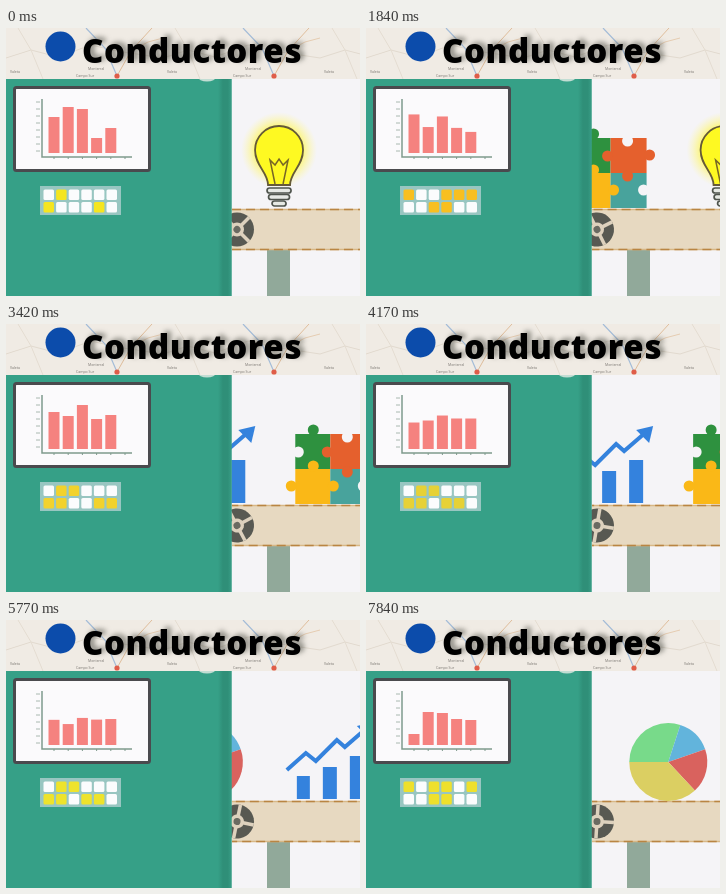
Recreate the animation shown at these times as an HTML page with a canvas. Size 354 px wide and 268 px high, loop 7.86 s.

```html
<!DOCTYPE html>
<html lang="es">
<head>
<meta charset="utf-8">
<title>Conductores</title>
<style>
  html, body { margin: 0; width: 100%; height: 100%; overflow: hidden; background: #f5f4f7; }
  canvas { position: absolute; left: 0; top: 0; }
  h1 {
    position: absolute; left: 76px; top: 1px; margin: 0;
    font: 800 33px/44px "Open Sans", sans-serif; letter-spacing: .5px;
    color: #000; white-space: nowrap;
    text-shadow: 4px -2px 5px rgba(80, 80, 72, .6);
  }
</style>
</head>
<body>
<canvas id="stage" width="354" height="268"></canvas>
<h1>Conductores</h1>
<script>
const ctx = document.getElementById('stage').getContext('2d');
const LOOP = 7860, TAU = Math.PI * 2;

// time, tops of the five bars, lamp rows, lamp colour
const KEYS = [
  [0,    [89, 79, 81, 110, 100],  '010000100010', '#f5e51f'],
  [1110, [94, 94, 92, 114, 116],  '100111011100', '#f7e71c'],
  [2560, [79, 104, 85, 86, 92],   '100111001100', '#f8bf20'],
  [3420, [88, 92, 81, 95, 91],    '011000110011', '#f2d22c'],
  [4920, [109, 101, 102, 94, 98], '011000110110', '#e6d136'],
  [6590, [91, 107, 94, 105, 100], '011000110110', '#eee32c'],
  [7840, [114, 92, 93, 99, 100],  '101101001100', '#eee02c']
];

function rect(x, y, w, h, fill) {
  ctx.fillStyle = fill;
  ctx.fillRect(x, y, w, h);
}

function disc(x, y, r, fill, ry = r) {
  ctx.fillStyle = fill;
  ctx.beginPath();
  ctx.ellipse(x, y, r, ry, 0, 0, TAU);
  ctx.fill();
}

function line(points, color, width, dash = [], shift = 0) {
  ctx.strokeStyle = color;
  ctx.lineWidth = width;
  ctx.setLineDash(dash);
  ctx.lineDashOffset = shift;
  ctx.beginPath();
  for (let i = 0; i < points.length; i += 2) ctx.lineTo(points[i], points[i + 1]);
  ctx.stroke();
  ctx.setLineDash([]);
}

function at(x, draw) {
  ctx.save();
  ctx.translate(x, 0);
  draw();
  ctx.restore();
}

function bulb() {
  const glow = ctx.createRadialGradient(0, 122, 22, 0, 122, 38);
  glow.addColorStop(0, 'rgba(255, 246, 70, .8)');
  glow.addColorStop(1, 'rgba(255, 246, 150, 0)');
  disc(0, 122, 38, glow);
  ctx.beginPath();
  ctx.moveTo(-11, 157);
  ctx.bezierCurveTo(-11, 144, -24, 138, -24, 122);
  ctx.arc(0, 122, 24, Math.PI, 0);
  ctx.bezierCurveTo(24, 138, 11, 144, 11, 157);
  ctx.closePath();
  ctx.fillStyle = '#fef922';
  ctx.fill();
  ctx.strokeStyle = '#655a38';
  ctx.lineWidth = 1.8;
  ctx.stroke();
  line([-4, 156, -9, 132, -4, 137, 0, 131, 4, 137, 9, 132, 4, 156], '#776626', 1.5);
  for (const [y, w] of [[160, 12], [166.5, 10.5], [173, 7]]) {
    ctx.beginPath();
    ctx.roundRect(-w, y, w * 2, 5, 2.5);
    ctx.fillStyle = '#e6e9e4';
    ctx.fill();
    ctx.strokeStyle = '#4f544d';
    ctx.lineWidth = 1.7;
    ctx.stroke();
  }
}

function puzzle() {
  const green = '#2e913f', red = '#e5602d', yellow = '#fab817', teal = '#48a39c', gap = '#f5f4f7';
  rect(-35, 110, 35, 35, green);
  rect(0, 110, 36, 35, red);
  rect(-35, 145, 35, 35, yellow);
  rect(0, 145, 36, 35, teal);
  const knobs = [
    [-17, 106, green], [-32, 128, gap], [17, 113, gap], [39, 127, red],
    [-3, 128, red], [-17, 142, yellow], [17, 148, red], [3, 162, yellow],
    [-39, 162, yellow], [33, 162, gap]
  ];
  for (const [x, y, fill] of knobs) disc(x, y, 5.5, fill);
}

function growth() {
  const blue = '#3482dd';
  rect(-33, 156, 13, 23, blue);
  rect(-7, 147, 14, 32, blue);
  rect(20, 136, 14, 43, blue);
  line([-43, 150, -24, 133, -14, 141, 7, 120, 15, 127, 37, 108], blue, 4);
  ctx.fillStyle = blue;
  ctx.beginPath();
  ctx.moveTo(44, 102);
  ctx.lineTo(27, 106);
  ctx.lineTo(40, 119);
  ctx.fill();
}

function pie() {
  const colors = ['#78da8a', '#62b4dc', '#d9625e', '#dbcf62'];
  const edges = [180, 288, 341, 407, 540];
  colors.forEach((fill, i) => {
    ctx.beginPath();
    ctx.moveTo(0, 142);
    ctx.arc(0, 142, 39, edges[i] * TAU / 360, edges[i + 1] * TAU / 360);
    ctx.closePath();
    ctx.fillStyle = fill;
    ctx.fill();
  });
}

function wheel(angle) {
  const light = '#ddd1bd';
  ctx.save();
  ctx.translate(231, 201.5);
  ctx.rotate(angle + TAU / 8);
  disc(0, 0, 17, '#585952');
  line([-17, 0, 17, 0], light, 3.5);
  line([0, -17, 0, 17], light, 3.5);
  disc(0, 0, 7, light);
  disc(0, 0, 3.5, '#6a6a61');
  ctx.restore();
}

function conveyor(d) {
  rect(225, 51, 129, 217, '#f5f4f7');
  rect(261, 222, 23, 46, '#91a99a');
  rect(226, 182, 128, 40, '#e7d9c1');
  for (const [y, dir] of [[181.5, -1], [221.5, 1]]) {
    line([226, y, 354, y], '#d8b886', 1.5);
    line([226, y, 354, y], '#b98543', 1.5, [9, 5], dir * d);
  }
  wheel(d / 17);
  at(273 + d, bulb);
  at(159 + d, puzzle);
  at(40 + d, growth);
  at(-86 + d, pie);
}

function machine() {
  rect(0, 51, 225.5, 217, '#36a087');
  const shade = ctx.createLinearGradient(212, 0, 226, 0);
  shade.addColorStop(0, '#36a087');
  shade.addColorStop(.35, '#2f8f78');
  shade.addColorStop(.7, '#2f8f78');
  shade.addColorStop(1, '#3a9f88');
  rect(212, 51, 13.5, 217, shade);
  disc(201, 49, 9, '#c2ddd3', 4.5);
}

function screen(tops) {
  ctx.beginPath();
  ctx.roundRect(8.5, 59.5, 135, 83, 2);
  ctx.fillStyle = '#fbfafc';
  ctx.fill();
  ctx.strokeStyle = '#4a4a4e';
  ctx.lineWidth = 3;
  ctx.stroke();
  line([36, 71, 36, 129, 126, 129], '#7f9a8d', 1.5);
  for (let y = 74; y < 126; y += 7) line([30, y, 34, y], '#a9b8b0', 1);
  for (let x = 48; x < 126; x += 14.2) line([x, 129, x, 131], '#7f9a8d', 1);
  tops.forEach((y, i) => rect(42.5 + i * 14.2, y, 11, 125 - y, '#f5827f'));
}

function lamps(pattern, color) {
  rect(34, 158, 81, 29, '#98c6c1');
  [...pattern].forEach((on, i) => {
    ctx.beginPath();
    ctx.roundRect(37.5 + i % 6 * 12.6, i < 6 ? 161.5 : 174, 10.5, 10.5, 1.5);
    ctx.fillStyle = on === '1' ? color : '#fbfcfd';
    ctx.fill();
  });
}

function mapTile() {
  line([0, 30, 25, 22, 52, 29, 85, 17, 111, 23, 157, 30], '#e2dacf', 1);
  line([12, 0, 25, 22, 37, 51], '#e4dcd1', 1);
  line([125, 23, 142, 14, 157, 10], '#e6cdb2', 1);
  line([111, 48, 125, 23, 146, 0], '#dfbd9b', 1);
  line([80, 0, 99, 20, 111, 48], '#a3bcd8', 1.2);
  disc(111, 48, 2.6, '#df5d49');
  ctx.fillStyle = '#77736e';
  ctx.font = '3.5px "Open Sans", sans-serif';
  ctx.fillText('Valeta', 4, 45);
  ctx.fillText('Monterral', 82, 42);
  ctx.fillText('Campo Sur', 70, 49);
}

function header() {
  ctx.save();
  ctx.beginPath();
  ctx.rect(0, 0, 354, 51);
  ctx.clip();
  rect(0, 0, 354, 51, '#f0ebe4');
  for (const x of [0, 157, 314]) at(x, mapTile);
  ctx.restore();
  disc(54.5, 18.5, 15, '#0c4cab');
}

function draw(now) {
  const t = now % LOOP;
  const travel = t < 1110 ? t * .0439 : 48.7 + (t - 1110) * .05045;
  const i = Math.max(0, KEYS.findLastIndex(k => k[0] <= t));
  const a = KEYS[i], b = KEYS[Math.min(i + 1, KEYS.length - 1)];
  const p = a === b ? 0 : (t - a[0]) / (b[0] - a[0]);
  const lit = p < .5 ? a : b;

  conveyor(travel);
  machine();
  screen(a[1].map((y, n) => y + (b[1][n] - y) * p));
  lamps(lit[2], lit[3]);
  header();
}

const start = performance.now();
function frame(now) {
  draw(Math.max(0, now - start));
  requestAnimationFrame(frame);
}
draw(0);
requestAnimationFrame(frame);
</script>
</body>
</html>
```
